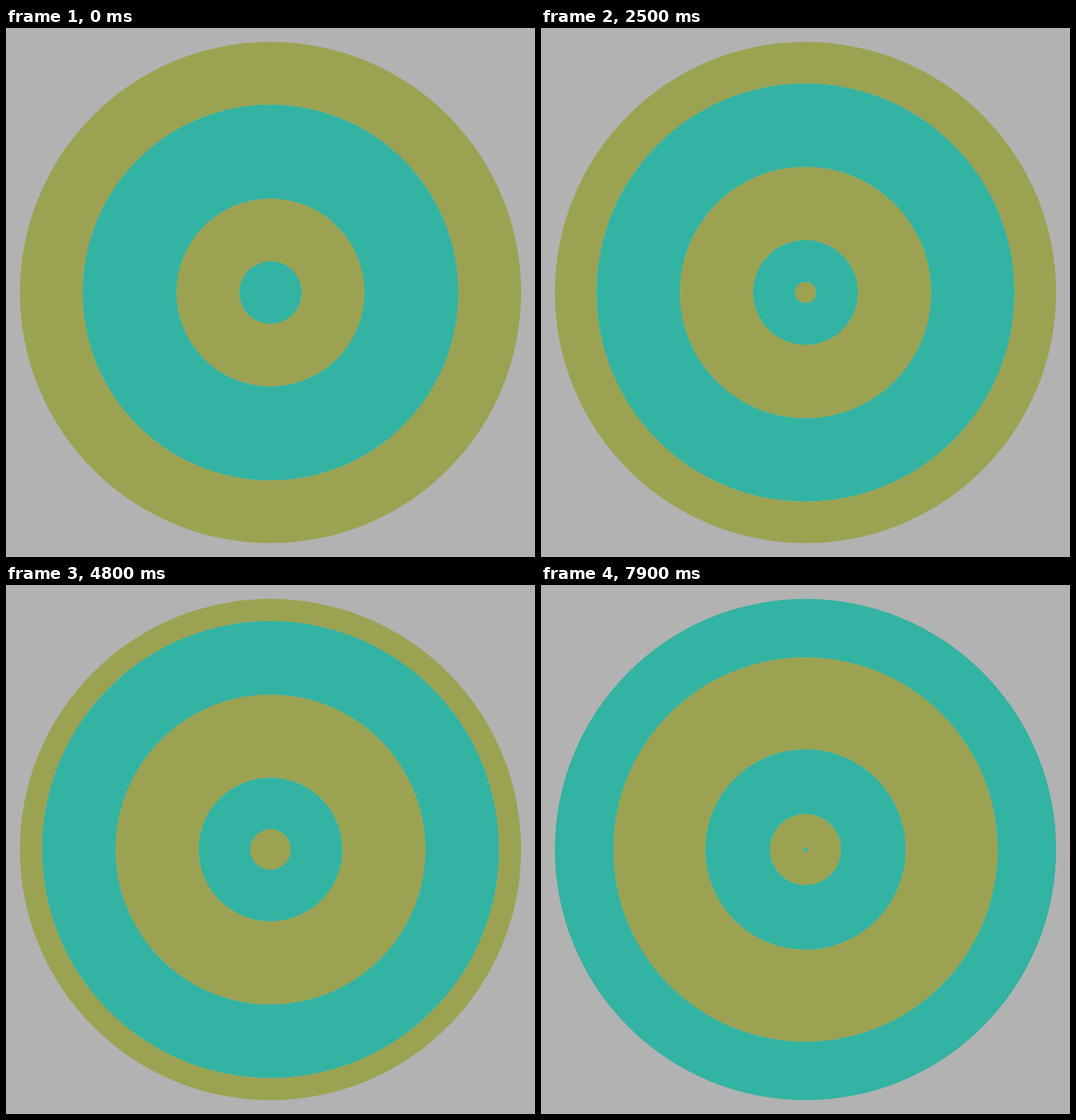
Animation, 748 px wide and 748 px high, one loop 8000 ms. Source, as an HTML page with a canvas:

```html
<!DOCTYPE html>
<html lang="en">
<head>
<meta charset="utf-8">
<title>Growing rings</title>
<style>
  html, body { margin: 0; width: 100%; height: 100%; overflow: hidden; background: #b2b2b2; }
  canvas { display: block; width: 748px; height: 748px; }
</style>
</head>
<body>
<canvas id="stage" width="748" height="748"></canvas>
<script>
const ctx = document.getElementById('stage').getContext('2d');
const SIZE = 748, CENTER = SIZE / 2, RADIUS = 354.4;
const LOOP = 8000, STEP = 100, PERIOD = 7400;
const COLORS = ['#9ba352', '#33b3a1'];
// Ring edges in eighths of the disc; each edge glides to the next one in a period.
const EDGES = [0, 1, 3, 6, 8];

function ring(inner, outer, color) {
  ctx.beginPath();
  ctx.arc(CENTER, CENTER, outer, 0, Math.PI * 2);
  if (inner > 0) {
    ctx.moveTo(CENTER + inner, CENTER);
    ctx.arc(CENTER, CENTER, inner, 0, Math.PI * 2);
  }
  ctx.fillStyle = color;
  ctx.fill('evenodd');
}

function draw(time) {
  const cycle = Math.floor(time / PERIOD);
  const part = (time % PERIOD) / PERIOD;
  ctx.fillStyle = '#b2b2b2';
  ctx.fillRect(0, 0, SIZE, SIZE);

  let inner = 0;
  EDGES.forEach((edge, i) => {
    const next = EDGES[i + 1] ?? edge;
    const outer = (edge + (next - edge) * part) / 8 * RADIUS;
    if (outer > inner) ring(inner, outer, COLORS[(i + cycle) % 2]);
    inner = outer;
  });
}

function tick() {
  const time = performance.now() % LOOP;
  draw(Math.floor(time / STEP) * STEP);
  requestAnimationFrame(tick);
}
tick();
</script>
</body>
</html>
```
